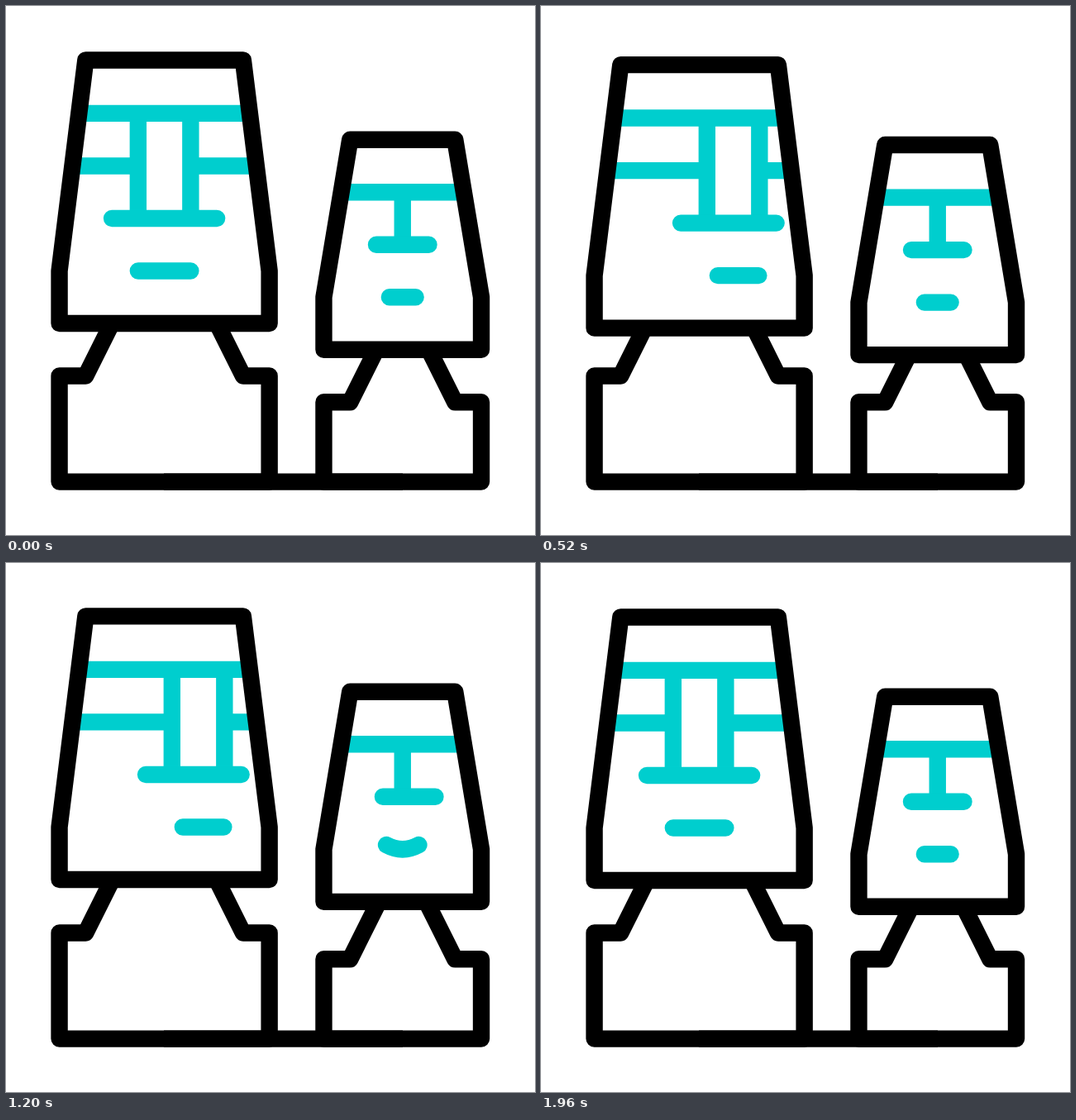
Animation, 640 px wide and 640 px high, one loop 2.56 s. Source, as an HTML page:

```html
<!DOCTYPE html>
<html lang="en">
<head>
<meta charset="utf-8">
<title>Stone heads</title>
<style>
html, body { margin: 0; width: 100%; height: 100%; overflow: hidden; background: #fff; }
svg { display: block; width: 100%; height: 100%; }
path { fill: none; stroke: #000; stroke-width: 20.4px; stroke-linejoin: round; vector-effect: non-scaling-stroke; }
.face { stroke: #00cece; }
.round { stroke-linecap: round; }
.skin { fill: #fff; stroke: none; }
</style>
</head>
<body>
<svg id="stage" viewBox="0 0 640 640"></svg>
<script>
const LOOP = 2560, STEP = 40, UNIT = 31.76, BASE = 575.6;

// Figures are drawn in grid units around the middle of the chin line.
const figure = (name, x, chin, width, top) => {
  const brow = width - 1, base = (BASE - chin) / UNIT;
  const outline = `M${-brow} ${-top}H${brow}L${width} -2V0H${-width}V-2Z`;
  const side = s => `M${s * (brow - 1.07)} -.14L${s * brow} 2H${s * width}V${base}H0`;
  return `<g transform="translate(${x} ${chin}) scale(${UNIT})">
    <path d="${side(-1)}${side(1)}"/>
    <g id="${name}Head">
      <path class="skin" d="${outline}"/>
      <path class="face" id="${name}Brow"/>
      <path class="face round" id="${name}Lines"/>
      <path d="${outline}"/>
    </g></g>`;
};

stage.innerHTML = figure("big", 191.6, 384, 4, 10.03) + figure("small", 479.75, 415.8, 3, 8)
  + `<path d="M191 ${BASE}H480"/>`;

const shape = (id, d) => document.getElementById(id).setAttribute("d", d);
const lift = (id, y) => document.getElementById(id).setAttribute("transform", `translate(0 ${y / UNIT})`);

function draw(t) {
  // Eased progress from 0 to 1 between two times.
  const move = (from, to) => {
    const u = Math.min(1, Math.max(0, (t - from) / (to - from)));
    return u * u * (3 - 2 * u);
  };

  const turn = move(0, 520) - move(1213, 1733);
  const left = 1.29 * turn - 1, right = left + 2;
  lift("bigHead", 15.4 * move(0, 360) - 23.4 * move(360, 720) + 11.5 * move(720, 1050)
    - 11.5 * move(1050, 1400) + 8 * move(1400, 1840));
  shape("bigBrow", `M-3.25 -8H3.25M-3.5 -6H${left}M${right} -6H3.5M${left} -8V-4M${right} -8V-4`);
  shape("bigLines", `M${left - 1} -4H${2 + .93 * turn}M${1.7 * turn - 1} -2H${1 + 1.26 * turn}`);

  const sniff = (move(760, 1200) - 2 * move(1200, 1640) + move(1640, 1960)) / 4;
  const smile = move(640, 1200) - move(1520, 1960);
  const corner = .5 + .12 * smile, mouthY = -2 - .165 * smile;
  lift("smallHead", 18 * move(360, 760) - 24.4 * move(760, 1160)
    + 15.4 * move(1160, 1560) - 9 * move(1560, 1960));
  shape("smallBrow", "M-2.33 -6H2.33M0 -6V-4");
  shape("smallLines", `M${sniff - 1} -4H${sniff + 1}
    M${-corner} ${mouthY}Q0 ${.17 * smile - 2} ${corner} ${mouthY}`);
}

const start = performance.now();
function tick() {
  const t = (performance.now() - start) % LOOP;
  draw(Math.floor(t / STEP) * STEP);
  requestAnimationFrame(tick);
}
tick();
</script>
</body>
</html>
```
